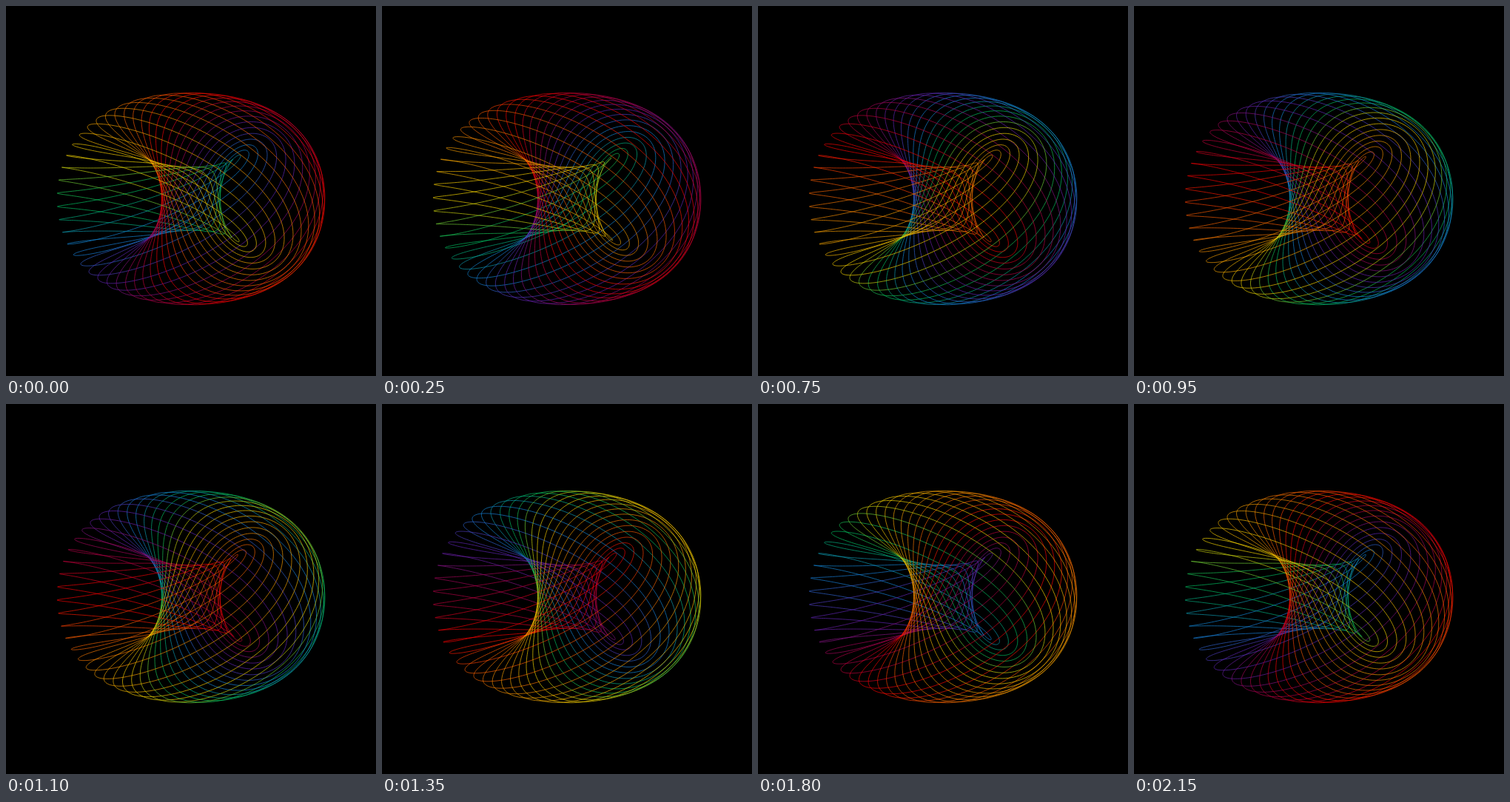
An HTML page with a canvas that plays this animation: 500 px wide and 500 px high, repeating every 2.2 s.

```html
<!DOCTYPE html>
<html>
<head>
<meta charset="utf-8">
<style>
html, body { margin: 0; width: 100%; height: 100%; overflow: hidden; background: #000; }
canvas { display: block; }
</style>
</head>
<body>
<canvas id="stage" width="500" height="500"></canvas>
<script>
const ctx = document.getElementById('stage').getContext('2d');
const RINGS = 30, STEP_MS = 50, STEPS = 44, TURN = 8;
const CX = 250, CY = 260.5;
const MAJOR = 110.3, MINOR = 70.7, TILT = 0.4545, HEIGHT = 87.4;
const KEYS = ['#f50000', '#f05f00', '#f09b00', '#f0d200', '#00be5f', '#1482d7', '#5f23af', '#af0046'];
const rad = deg => deg * Math.PI / 180;

// Eased blend between evenly spaced key colours around the circle
function colour(angle) {
  const pos = angle % 360 / 360 * KEYS.length;
  const i = Math.floor(pos), t = pos - i;
  const share = 100 * t * t * (3 - 2 * t);
  return `color-mix(in srgb, ${KEYS[(i + 1) % KEYS.length]} ${share.toFixed(2)}%, ${KEYS[i]})`;
}

// One loop that winds once around a tilted torus in both directions
function ring(phase) {
  ctx.beginPath();
  for (let deg = 0; deg < 360; deg += 2) {
    const u = rad(deg), v = u + phase;
    const reach = MAJOR + MINOR * Math.cos(v);
    ctx.lineTo(CX + reach * Math.cos(u),
               CY + TILT * reach * Math.sin(u) + HEIGHT * Math.sin(v));
  }
  ctx.closePath();
  ctx.stroke();
}

function draw(now) {
  const step = Math.floor(now / STEP_MS) % STEPS;
  ctx.clearRect(0, 0, 500, 500);
  ctx.lineWidth = 0.7;
  for (let i = 0; i < RINGS; i++) {
    const hue = 171 + i * 360 / RINGS;
    ctx.strokeStyle = colour(hue);
    ring(rad(hue + 4 + TURN * step));
  }
}

const start = performance.now();
function tick() {
  draw(performance.now() - start);
  requestAnimationFrame(tick);
}
tick();
</script>
</body>
</html>
```
